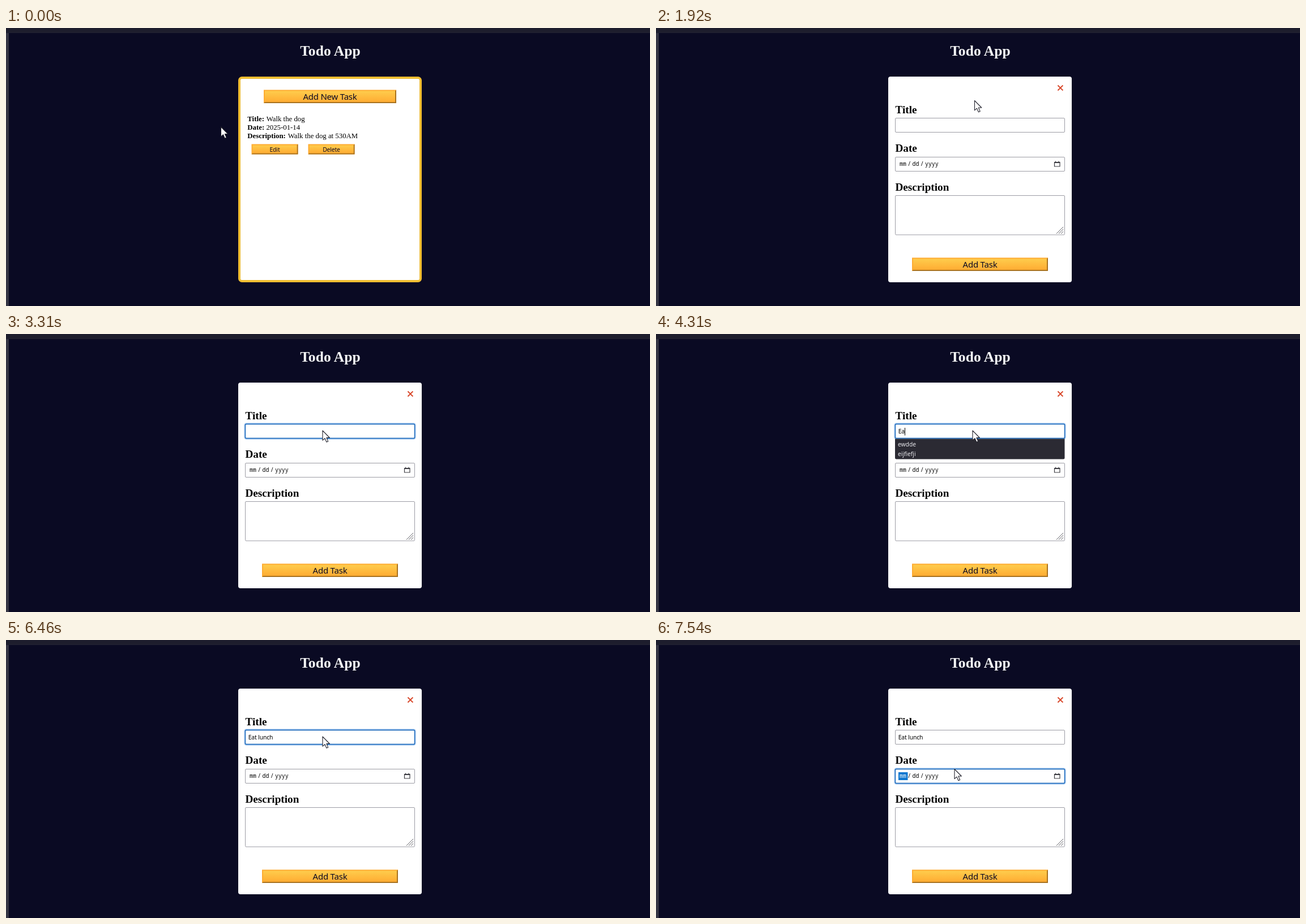
Animation of 1137x492 px, one loop 8 s. Source, as an HTML page:

```html
<!DOCTYPE html>
<html lang="en">
<head>
<meta charset="utf-8">
<title>Todo App</title>
<style>
  html, body { margin: 0; width: 100%; height: 100%; overflow: hidden; background: #0a0a23; }
  svg { display: block; width: 100vw; height: 100vh; }
  text { white-space: pre; }
  .serif { font: 12.8px "Liberation Serif", "Times New Roman", serif; }
  .bold { font-weight: 700; }
  .label { font-size: 19.2px; }
  .ui { font: 10.4px "Noto Sans", "Open Sans", sans-serif; letter-spacing: -.015em; }
  .big { font-size: 15px; }
  .mono { font: 9.9px "Noto Sans Mono", monospace; }
  .menu { font: 10.3px "Open Sans", sans-serif; fill: #f4f4f8; }
  .mid { text-anchor: middle; }
</style>
</head>
<body>
<svg id="stage" viewBox="0 0 1137 492"></svg>
<script>
const LOOP = 8000;
const stage = document.getElementById('stage');

const gradient = (id, top, bottom) =>
  `<linearGradient id="${id}" x2="0" y2="1"><stop stop-color="${top}"/><stop offset="1" stop-color="${bottom}"/></linearGradient>`;

const text = (x, y, cls, str, extra = '') =>
  `<text x="${x}" y="${y}" class="${cls}" ${extra}>${str}</text>`;

// Button with a raised two-tone border
function button(x, y, w, h, str, baseline, cls = '', id = '') {
  const b = 2, r = x + w, d = y + h;
  return `<rect x="${x}" y="${y}" width="${w}" height="${h}" fill="#feac32"/>
    <path d="M${r} ${y}V${d}H${x}l${b} ${-b}H${r - b}V${y + b}z" fill="#a8721f"/>
    <rect ${id && `id="${id}"`} x="${x + b}" y="${y + b}" width="${w - 2 * b}" height="${h - 2 * b}" fill="url(#gold)"/>
    ${text(x + w / 2, baseline, 'ui mid ' + cls, str, 'fill="#0a0a23"')}`;
}

const field = (y, h) =>
  `<rect x="422.5" y="${y}" width="299" height="${h}" rx="1.5" fill="#fff" stroke="#9c9ca4"/>`;

const focusRing = (id, y) => `<g id="${id}" fill="none">
  <rect x="421.5" y="${y - 1}" width="301" height="27" rx="3" stroke="#a6c9f0" stroke-width="2.4"/>
  <rect x="422.5" y="${y}" width="299" height="25" rx="1.5" stroke="#1564b8" stroke-width="1.4"/></g>`;

const taskLine = (y, name, value, x) =>
  text(426.3, y, 'serif bold', name + ':') + text(x, y, 'serif', value);

stage.innerHTML = `
<defs>${gradient('gold', '#fecc4c', '#ffac33')}${gradient('goldHover', '#ffcc4c', '#f89808')}</defs>
<rect width="1137" height="492" fill="#0a0a23"/>
<rect width="1137" height="8" fill="#1d1d2d"/>
<rect y="7.6" width="1137" height="1" fill="#2a2a39"/>
<rect y="9" width="5" height="483" fill="#343443"/>
${text(572.4, 48.5, 'serif bold mid', 'Todo App', 'style="font-size:25.6px" fill="#f5f6f7"')}

<g id="list">
  <rect x="412" y="88" width="320" height="360" rx="4.5" fill="#fff" stroke="#f1be32" stroke-width="4"/>
  ${button(455, 109.5, 234, 23.5, 'Add New Task', 127.2, 'big', 'addNew')}
  ${taskLine(165, 'Title', 'Walk the dog', 459.7)}
  ${taskLine(180, 'Date', '2025-01-14', 459.4)}
  ${taskLine(195, 'Description', 'Walk the dog at 530AM', 497.8)}
  ${button(433.5, 205.5, 82, 18, 'Edit', 218.6)}
  ${button(533.5, 205.5, 82, 18, 'Delete', 218.6)}
</g>

<g id="form">
  <rect x="410" y="86" width="324" height="364" rx="4" fill="#fff"/>
  <path d="M709.4 101.5l9 9m0-9l-9 9" stroke="#d8482b" stroke-width="1.8"/>
  ${text(422.5, 150.5, 'serif bold label', 'Title')}
  ${text(422.5, 219, 'serif bold label', 'Date')}
  ${text(422.5, 287.5, 'serif bold label', 'Description')}
  ${field(159.5, 25)}${field(228.5, 25)}${field(296.5, 69.5)}
  ${focusRing('titleRing', 159.5)}${focusRing('dateRing', 228.5)}
  <text id="typed" x="427.7" y="176" class="ui"></text>
  <rect id="caret" y="166" width="1" height="13.5"/>
  <rect id="monthBox" x="428" y="234" width="16.5" height="14" fill="#0f78d0"/>
  ${text(430, 244.3, 'mono', 'mm', 'id="month"')}
  ${text(444.3, 244.3, 'mono', '/')}
  ${text(452.5, 244.3, 'mono', 'dd')}
  ${text(466.8, 244.3, 'mono', '/')}
  ${text(475, 244.3, 'mono', 'yyyy')}
  <path d="M703.5 237.5h9.5v7.5h-9.5zM703.5 238.5h9.5M705.5 235.5v2M711 235.5v2" fill="none" stroke="#3a3a40" stroke-width="1.2"/>
  <path d="M707 364l12-12M711 364l8-8M715 364l4-4" stroke="#66666c"/>
  ${button(452, 406.5, 240, 23.5, 'Add Task', 424.2, 'big')}
  <g id="menu">
    <path d="M422 185.5h299.5v33.5a2.5 2.5 0 0 1-2.5 2.5h-294.500a2.500 2.500 0 0 1-2.500-2.500z" fill="#2b2a33"/>
    ${text(427, 198.7, 'menu', 'ewdde')}
    ${text(427, 216.3, 'menu', 'eijfiefji')}
  </g>
</g>

<path id="pointer" d="M0 0V17.2L4 13.6L6.900 20.300L9.700 19.100L6.900 12.500H12.300Z" fill="#fff" stroke="#22222c" stroke-width="1.1" stroke-linejoin="round"/>`;

const el = {};
stage.querySelectorAll('[id]').forEach(n => el[n.id] = n);

// Each move: first and last step time, number of steps, points passed
const moves = [
  [80, 150, 2, [[379.5, 175], [410, 178], [438, 174]]],
  [690, 1080, 6, [[438, 174], [500, 162], [545, 140], [562.5, 128.5]]],
  [2310, 2770, 7, [[562.5, 128.5], [561, 150], [559, 171]]],
  [6770, 7460, 10, [[559, 171], [547, 140], [536, 158], [530, 198], [527, 228.5]]]
];

const typing = [[0, ''], [4080, 'E'], [4310, 'Ea'], [4380, 'Eat'], [4770, 'Eat '],
  [5620, 'Eat l'], [6000, 'Eat lun'], [6150, 'Eat lunch']];

const caretSpans = [[2770, 3310], [3850, 5460], [5620, 6460], [7000, 7540]];

const within = (t, a, b) => t >= a && t < b;
const show = (node, on) => node.setAttribute('visibility', on ? 'inherit' : 'hidden');

function along(points, p) {
  const f = p * (points.length - 1);
  const i = Math.min(Math.floor(f), points.length - 2);
  return points[i].map((v, k) => v + (points[i + 1][k] - v) * (f - i));
}

function pointerAt(t) {
  let pos = moves[0][3][0];
  for (const [start, end, steps, points] of moves) {
    if (t < start) break;
    const done = Math.floor((t - start) / (end - start) * (steps - 1) + 1e-6) + 1;
    pos = along(points, Math.min(1, done / steps));
  }
  return pos;
}

function draw(t) {
  const formOpen = t >= 1920, dateFocus = t >= 7540;
  show(el.list, !formOpen);
  show(el.form, formOpen);
  el.addNew.setAttribute('fill', t >= 1000 ? 'url(#goldHover)' : 'url(#gold)');
  show(el.titleRing, formOpen && within(t, 2770, 7540));
  show(el.dateRing, dateFocus);
  show(el.monthBox, dateFocus);
  el.month.setAttribute('fill', dateFocus ? '#fff' : '#000');
  show(el.menu, within(t, 4150, 4460));

  const value = typing.filter(([at]) => t >= at).pop()[1];
  if (el.typed.textContent !== value) el.typed.textContent = value;
  const width = value ? el.typed.getComputedTextLength() : 0;
  el.caret.setAttribute('x', Math.round(428 + width));
  show(el.caret, caretSpans.some(([a, b]) => within(t, a, b)));

  el.pointer.setAttribute('transform', `translate(${pointerAt(t)})`);
}

let origin;
function tick(now) {
  origin ??= now;
  draw((now - origin) % LOOP);
  requestAnimationFrame(tick);
}
draw(0);
requestAnimationFrame(tick);
</script>
</body>
</html>
```
